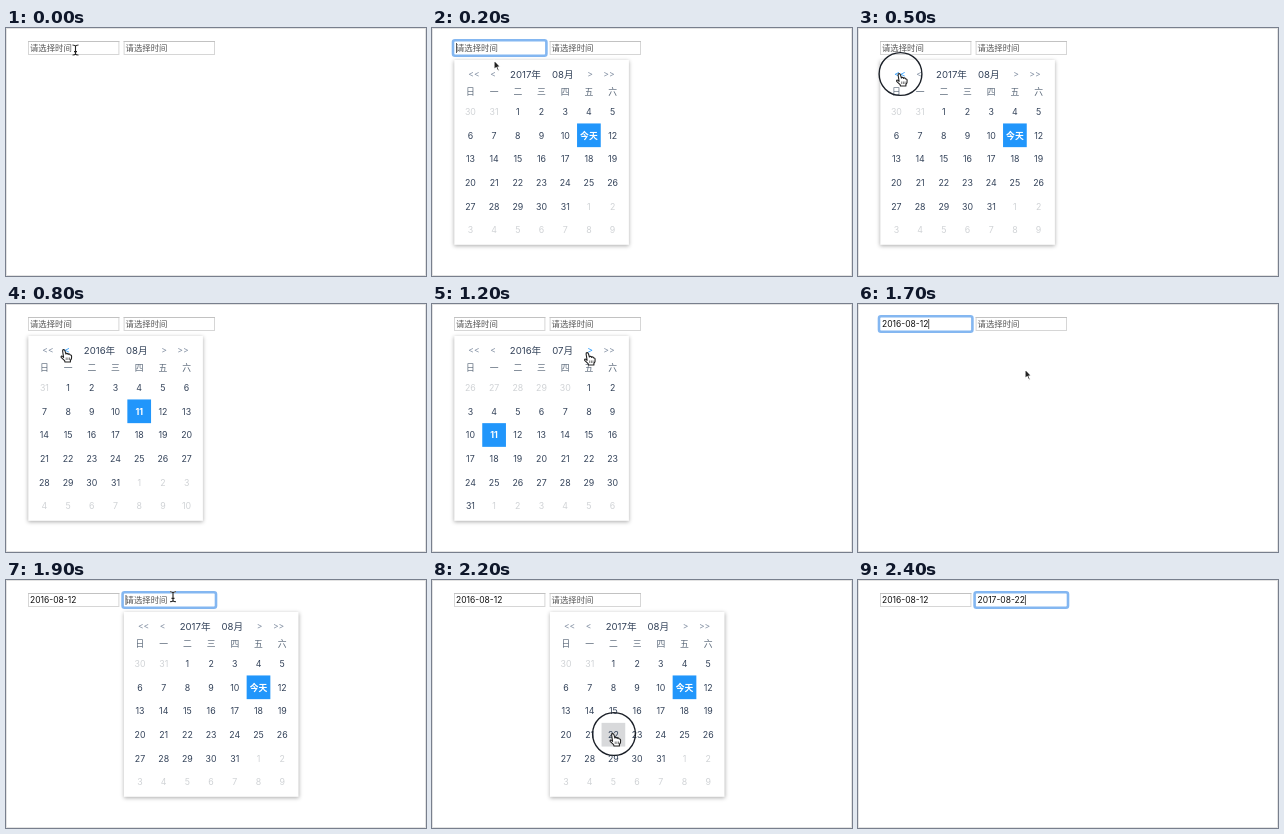
Write an HTML page with a canvas that moves like this. It is 420x248 px and loops after 2500 ms.

```html
<!DOCTYPE html>
<html lang="zh-CN">
<head>
<meta charset="utf-8">
<title>日期选择</title>
<style>
html, body { margin: 0; width: 100%; height: 100%; overflow: hidden; background: #fff; }
canvas { display: block; width: 420px; height: 248px; }
</style>
</head>
<body>
<canvas id="stage"></canvas>
<script>
const W = 420, H = 248, STEP = 100, LOOP = 2500;
const FONT = "Inter, 'Noto Sans CJK SC', 'Noto Sans CJK', sans-serif";
const BLUE = '#2196fb', INK = '#34435a', MUTED = '#d0d3d6', ARROW = '#8390a3';
const CELL = 23.7, COL0 = 38.4, ROW0 = 83.6, SHIFT = 95.6;
const HINT = '请选择时间';

const canvas = document.getElementById('stage');
const ctx = canvas.getContext('2d');
const ratio = window.devicePixelRatio || 1;
canvas.width = W * ratio;
canvas.height = H * ratio;

// Pointer at each step: kind, x, y
const pointer = [
  ['beam', 69.5, 22], ['beam', 69.5, 22], ['arrow', 62, 32], ['hand', 50, 41], ['hand', 42.5, 46],
  ['hand', 42.5, 46], ['hand', 42.5, 46], ['hand', 51, 46], ['hand', 59, 46], ['hand', 59, 46],
  ['hand', 59, 46], ['hand', 108, 48], ['hand', 156.5, 49], ['hand', 156.5, 49], ['hand', 163, 85],
  ['hand', 167, 111], ['arrow', 167, 111], ['arrow', 167, 65], ['beam', 167, 16.8], ['beam', 167, 16.8],
  ['hand', 170, 60], ['hand', 181, 120], ['hand', 182, 154], ['arrow', 182, 154], null
];
const presses = [5, 9, 13, 15, 22];

// Calendar shown at a step: [year, month, side]
function calendarAt(n) {
  if (n < 1) return null;
  if (n < 6) return [2017, 8, 0];
  if (n < 10) return [2016, 8, 0];
  if (n < 14) return [2016, 7, 0];
  if (n < 16) return [2016, 8, 0];
  if (n >= 19 && n < 23) return [2017, 8, 1];
  return null;
}

function text(str, x, y, size, color, align = 'center', weight = 400) {
  ctx.font = `${weight} ${size}px ${FONT}`;
  ctx.textAlign = align;
  ctx.fillStyle = color;
  ctx.fillText(str, x, y + size * 0.365);
}

function box(x, y, w, h, color) {
  ctx.fillStyle = color;
  ctx.fillRect(x, y, w, h);
}

function field(x, value, focused) {
  if (focused) {
    ctx.beginPath();
    ctx.roundRect(x - 1, 12.3, 93.4, 15.4, 2);
    ctx.fillStyle = '#fff';
    ctx.fill();
    ctx.lineWidth = 2.6;
    ctx.strokeStyle = '#84b7f1';
    ctx.stroke();
  } else {
    box(x, 13, 91.4, 14, '#d6d6d6');
    box(x, 13, 91.4, 1, '#c2c2c2');
    box(x + 1, 14, 89.4, 12, '#fff');
  }
  const size = value ? 8.5 : 8.4;
  text(value || HINT, x + 2, 20, size, value ? '#111' : '#555', 'left');
  if (focused) {
    const end = value ? ctx.measureText(value).width : 0;
    box(x + 2 + end, 15, 0.8, 10, '#333');
  }
}

function calendar(year, month, cursor) {
  ctx.save();
  ctx.shadowColor = 'rgba(0,0,0,0.32)';
  ctx.shadowBlur = 4 * ratio;
  ctx.shadowOffsetY = 0.8 * ratio;
  box(22.3, 32, 174.6, 184.8, '#fff');
  ctx.restore();

  const [mx, my] = cursor;
  for (const [label, x] of [['<<', 42], ['<', 61], ['>', 158], ['>>', 177]]) {
    const over = Math.abs(mx - x) < 7 && Math.abs(my - 46) < 7;
    text(label, x, 46, 8.6, over ? BLUE : ARROW);
  }
  text(year + '年', 93.5, 46, 9.6, INK);
  text(String(month).padStart(2, '0') + '月', 130.7, 46, 9.6, INK);

  [...'日一二三四五六'].forEach((d, i) => text(d, COL0 + i * CELL, 64.2, 8.8, '#5a6879'));

  const lead = new Date(Date.UTC(year, month - 1, 1)).getUTCDay();
  for (let i = 0; i < 42; i++) {
    const date = new Date(Date.UTC(year, month - 1, i - lead + 1));
    const day = date.getUTCDate();
    const inside = date.getUTCMonth() === month - 1;
    const x = COL0 + (i % 7) * CELL;
    const y = ROW0 + Math.floor(i / 7) * CELL;
    const chosen = inside && day === 11;
    const over = inside && Math.abs(mx - x) < CELL / 2 && Math.abs(my - y) < CELL / 2;
    if (chosen || over) {
      box(x - CELL / 2, y - CELL / 2, CELL, CELL, chosen ? BLUE : '#d8d9db');
    }
    const label = chosen && year === 2017 ? '今天' : String(day);
    text(label, x, y, 8.8, chosen ? '#fff' : inside ? INK : MUTED, 'center', chosen ? 700 : 400);
  }
}

function beam() {
  const p = new Path2D('M-3 -5 Q-.4 -5 0 -3.8 Q.4 -5 3 -5 M0 -3.8 V3.8 M-3 5 Q-.4 5 0 3.8 Q.4 5 3 5 M-1.5 1.6 H1.5');
  ctx.lineWidth = 2;
  ctx.strokeStyle = 'rgba(255,255,255,0.8)';
  ctx.stroke(p);
  ctx.lineWidth = 1.1;
  ctx.strokeStyle = '#222';
  ctx.stroke(p);
}

function outline(d, fill, stroke) {
  const p = new Path2D(d);
  ctx.lineWidth = 1.1;
  ctx.lineJoin = 'round';
  ctx.fillStyle = fill;
  ctx.fill(p);
  ctx.strokeStyle = stroke;
  ctx.stroke(p);
}

function hand() {
  outline('M-1.4 7.4 L-2.4 1 Q-2.5 -.3 -1.4 -.4 Q-.4 -.5 0 .8 L.9 4 Q1.2 3.1 2.2 3.4 Q3 3.6 3.1 4.4 ' +
    'Q3.5 3.7 4.3 4 Q5 4.3 5.1 5 Q6.4 4.7 6.6 6.2 L6.5 8.6 L5.4 10.4 V12 H0 L-.4 10.6 ' +
    'L-3.6 7.6 Q-4.3 6.4 -3.4 6 Q-2.6 5.8 -1.4 7.4 Z', '#fff', '#222');
  ctx.lineWidth = 0.6;
  ctx.stroke(new Path2D('M1.2 7.5 V10 M2.9 7.5 V10 M4.5 7.5 V10'));
}

function arrow() {
  outline('M0 0 V9.6 L2.2 7.6 L3.8 11.2 L5.4 10.5 L3.9 7 H6.8 Z', '#222', '#fff');
}

const shapes = { beam, hand, arrow };

function draw(n) {
  ctx.setTransform(ratio, 0, 0, ratio, 0, 0);
  box(0, 0, W, H, '#e3e3e3');
  box(1, 1, W - 2, H - 2, '#fff');

  const firstFocus = (n >= 1 && n < 5) || (n >= 16 && n < 19);
  field(22, n >= 16 ? '2016-08-12' : '', firstFocus);
  field(117.6, n >= 23 ? '2017-08-22' : '', n === 19 || n === 20 || n === 21 || n >= 23);

  const spot = pointer[n];
  const shown = calendarAt(n);
  if (shown) {
    const [year, month, side] = shown;
    ctx.save();
    ctx.translate(side * SHIFT, 0);
    calendar(year, month, [spot[1] - side * SHIFT, spot[2]]);
    ctx.restore();
  }
  if (!spot) return;

  const [kind, x, y] = spot;
  ctx.save();
  ctx.translate(x, y);
  if (presses.includes(n)) {
    ctx.beginPath();
    ctx.arc(0, 0, 21.4, 0, Math.PI * 2);
    ctx.lineWidth = 1.4;
    ctx.strokeStyle = '#1b2028';
    ctx.stroke();
  }
  shapes[kind]();
  ctx.restore();
}

const start = performance.now();
function tick(now) {
  const t = Math.max(0, now - start) % LOOP;
  draw(Math.floor(t / STEP));
  requestAnimationFrame(tick);
}
draw(0);
requestAnimationFrame(tick);
</script>
</body>
</html>
```
